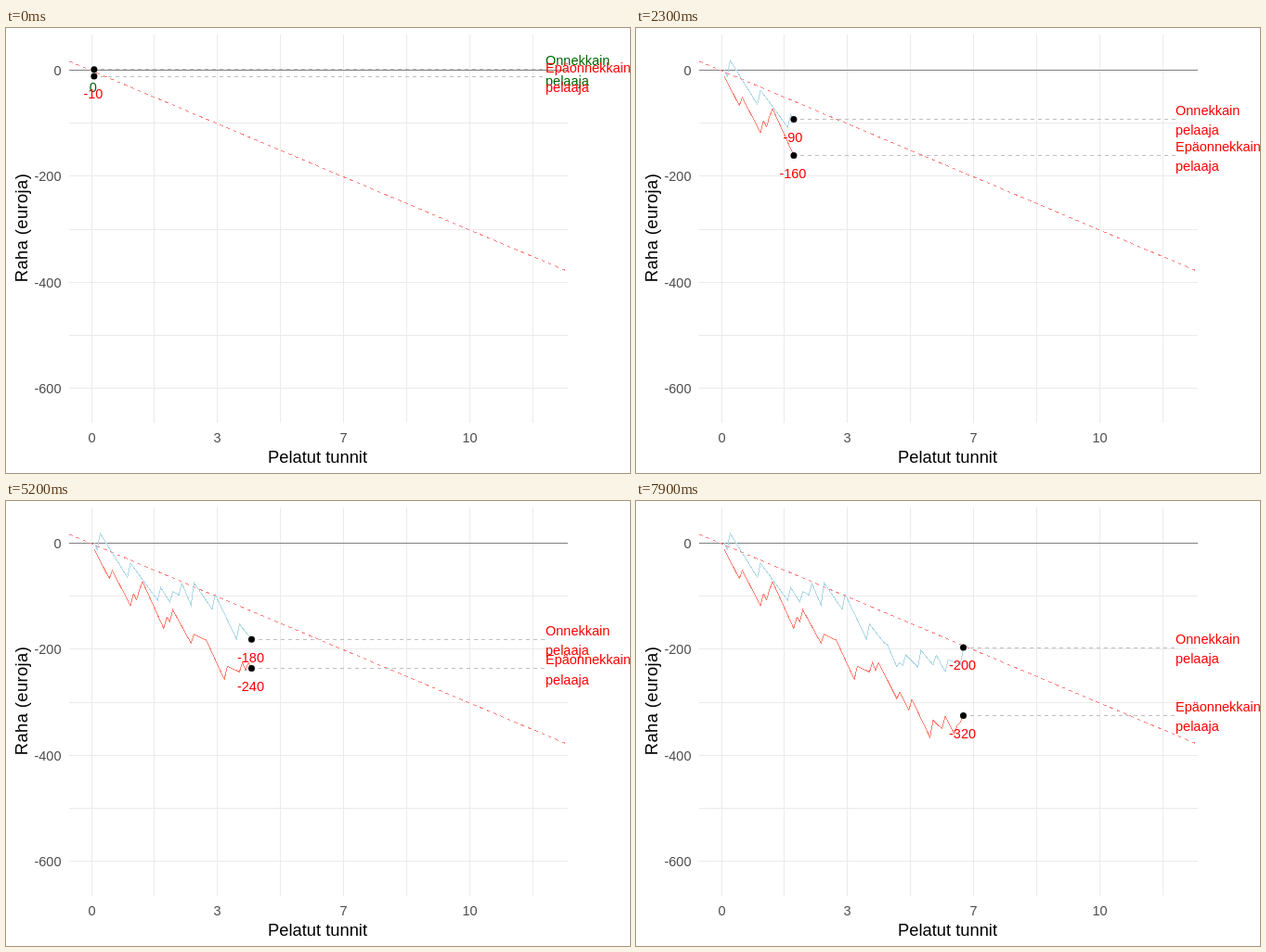
Write an HTML page that moves like this. It is 672x480 px and loops after 8 s.

```html
<!DOCTYPE html>
<html lang="fi">
<head>
<meta charset="utf-8">
<title>Pelatut tunnit</title>
<style>
  html, body { margin: 0; width: 100%; height: 100%; overflow: hidden; background: #fff; }
  svg { display: block; width: 672px; height: 480px; font: 14.5px "Liberation Sans", Arial, sans-serif; }
  line, polyline { fill: none; stroke-width: 1; shape-rendering: crispEdges; }
  .grid { stroke: #ebebeb; }
  .zero { stroke: #7f7f7f; }
  .trend { stroke: #ff7f7f; stroke-dasharray: 4 4; }
  .guide { stroke: #bebebe; stroke-dasharray: 4 4; }
  .tick { fill: #4d4d4d; }
  .title { font-size: 18.33px; }
  .mid { text-anchor: middle; }
  .end { text-anchor: end; }
</style>
</head>
<body>
<svg id="chart" viewBox="0 0 672 480"></svg>
<script>
const STEP = 100, STEPS = 80;
const LEFT = 68, RIGHT = 605, TOP = 7, BOTTOM = 426;
const LABEL_X = 581;

// Money drains evenly between turns; a turn is [step, balance, gain in the next step]
const players = [
  {
    name: "Onnekkain", color: "#add8e6", start: 1,
    turns: [
      [1, -12, 30], [11, -65, 27], [21, -108, 24], [25, -111, 19], [28, -98, 22],
      [32, -117, 42], [39, -125, 28], [47, -181, 28], [53, -189, -3], [57, -233, 8],
      [59, -230, 19], [64, -234, 32], [69, -230, 19], [73, -242, 22], [78, -229, 32]
    ]
  },
  {
    name: "Epäonnekkain", color: "#fa8072", start: -12,
    turns: [
      [5, -67, 15], [12, -118, 22], [14, -107, 19], [15, -88, 15], [23, -161, 21],
      [25, -148, 22], [32, -189, 17], [37, -183, -12], [43, -257, 25], [48, -243, 18],
      [50, -240, 15], [57, -293, 12], [61, -315.5, 21], [68, -366, 32], [72, -350, 24],
      [76, -359, 15], [78, -338, 13]
    ]
  }
];

const chart = document.getElementById("chart");
const gameX = game => 92.02 + 2.7148 * game;
const stepX = step => 94.9 + 3.261 * step;
const euroY = euros => 45.2 - 0.573 * euros;
const crisp = v => Math.floor(v) + 0.5;

function add(tag, attrs, text = "") {
  const el = document.createElementNS("http://www.w3.org/2000/svg", tag);
  set(el, attrs);
  el.textContent = text;
  chart.append(el);
  return el;
}

function set(el, attrs) {
  for (const key in attrs) el.setAttribute(key, attrs[key]);
}

function addLine(cls, x1, y1, x2, y2) {
  return add("line", { class: cls, x1, y1, x2, y2 });
}

function balances({ start, turns }) {
  const data = [start];
  for (const [step, balance, gain] of turns) {
    const from = data.length - 1;
    const slope = (balance - data[from]) / (step - from || 1);
    while (data.length <= step) data.push(data.at(-1) + slope);
    data.push(balance + gain);
  }
  return data;
}

function drawAxes() {
  for (let game = 0; game <= 175; game += 25) {
    const x = crisp(gameX(game));
    addLine("grid", x, TOP, x, BOTTOM);
    if (game % 50 === 0) {
      add("text", { class: "tick mid", x, y: 447 }, Math.round(game / 15));
    }
  }
  for (let euros = 0; euros >= -600; euros -= 100) {
    const y = crisp(euroY(euros));
    addLine("grid", LEFT, y, RIGHT, y);
    if (euros % 200 === 0) {
      add("text", { class: "tick end", x: 59.5, y: y + 5.5 }, euros);
    }
  }
  add("text", { class: "title mid", x: 335.5, y: 469 }, "Pelatut tunnit");
  add("text", {
    class: "title mid", transform: "translate(22.5 215.5) rotate(-90)", "letter-spacing": 0.4
  }, "Raha (euroja)");
  const zero = crisp(euroY(0));
  addLine("zero", LEFT, zero, RIGHT, zero);
  addLine("trend", LEFT, 35.9, RIGHT, 262.5);
}

drawAxes();

// One pass per layer, so that later layers lie above both players
for (const p of players) {
  p.data = balances(p);
  p.path = add("polyline", { stroke: p.color });
}
for (const p of players) p.guide = addLine("guide", 0, 0, 580.6, 0);
for (const p of players) p.dot = add("circle", { r: 3.5 });
for (const p of players) p.value = add("text", { class: "mid" });
for (const p of players) {
  p.lines = [p.name, "pelaaja"].map(text => add("text", { x: LABEL_X }, text));
}

function drawPlayer(p, step) {
  const euros = p.data[step];
  const x = stepX(step), y = euroY(euros);
  const fill = euros < 0 ? "#f00" : "#006400";
  const points = p.data.slice(0, step + 1).map((v, i) => `${stepX(i)},${euroY(v)}`);
  set(p.path, { points: points.join(" ") });
  set(p.guide, { x1: Math.floor(x), y1: crisp(y), y2: crisp(y) });
  set(p.dot, { cx: x, cy: y });
  set(p.value, { x: x - 1, y: Math.round(y + 24.2), fill });
  p.value.textContent = Math.round(euros / 10) * 10;
  p.lines.forEach((line, i) => set(line, { y: Math.round(y - 4.4 + 21.3 * i), fill }));
}

const start = performance.now();
let shown = -1;

function tick() {
  const elapsed = Math.max(0, performance.now() - start);
  const step = Math.floor(elapsed / STEP) % STEPS;
  if (step !== shown) {
    shown = step;
    for (const p of players) drawPlayer(p, step);
  }
  requestAnimationFrame(tick);
}
tick();
</script>
</body>
</html>
```
